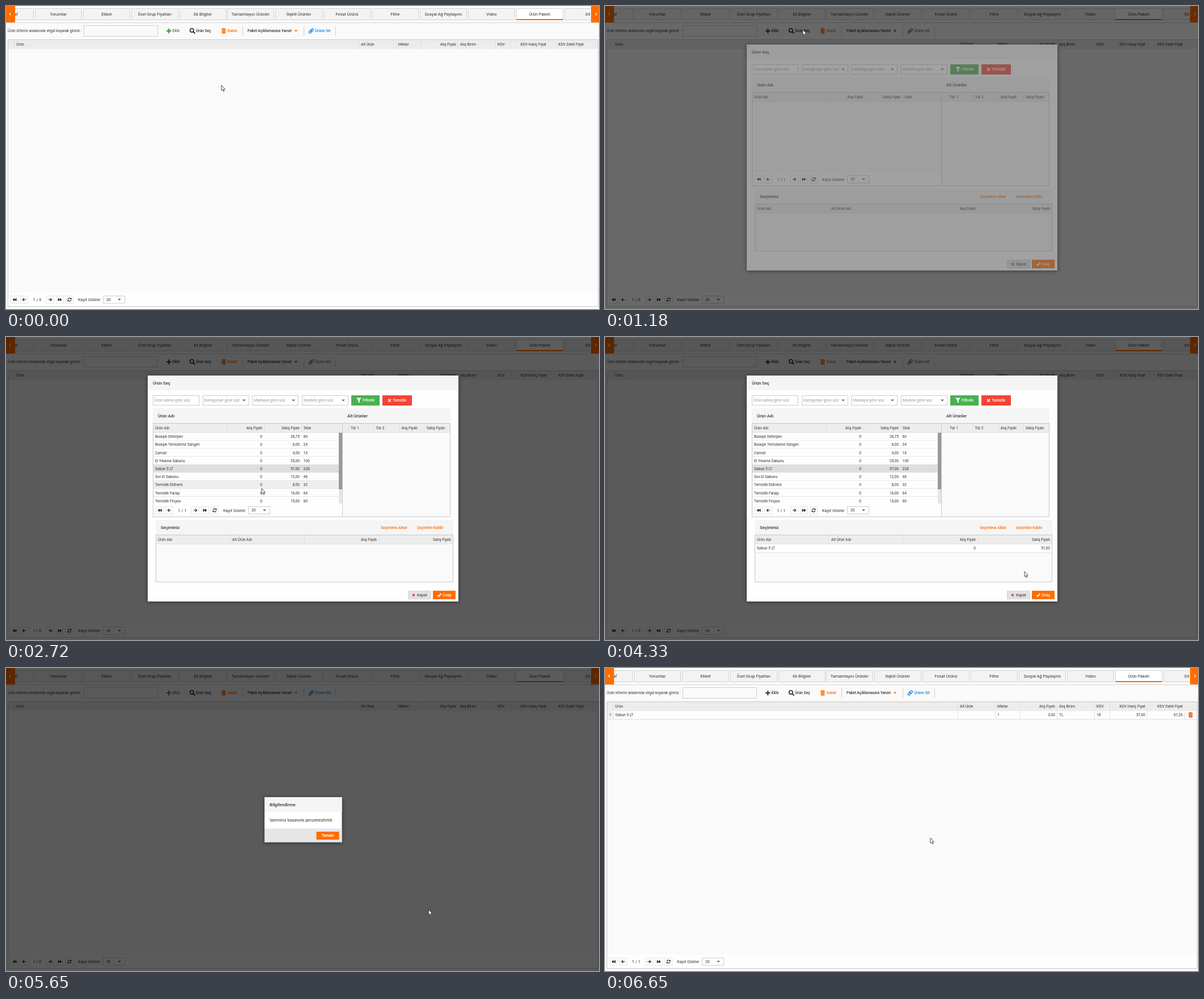
An HTML page with a canvas for the animation above (7.49 s loop, 1046 by 535 pixels).

```html
<!DOCTYPE html>
<html lang="tr">
<head>
<meta charset="utf-8">
<title>Ürün Paketi</title>
<style>
  html, body { margin: 0; width: 100%; height: 100%; overflow: hidden; background: #fafafa; }
  canvas { display: block; }
</style>
</head>
<body>
<canvas id="stage" width="1046" height="535"></canvas>
<script>
const ctx = document.getElementById('stage').getContext('2d');
const LOOP = 7490;
const ORANGE = '#ff6d00', INK = '#333', LINE = '#c8c8c8', SOFT = '#e2e2e2';

// Bursts of screen updates: start, end, number of steps.
const bursts = [
  [120, 800, 10], [870, 1560, 10], [1640, 1870, 4], [2020, 2720, 10],
  [2790, 3480, 10], [3560, 3720, 3], [4020, 4710, 10], [4790, 4870, 2],
  [5020, 5020, 1], [5650, 6340, 10], [6420, 6650, 4]
];

// Pointer path: time, x, y.
const path = [
  [50, 380, 140], [420, 366, 92], [800, 349, 42], [1250, 349, 42],
  [1560, 422, 121], [1870, 383, 226], [2100, 383, 226], [2650, 451, 267.5],
  [2720, 451, 267.5], [3400, 704, 333], [3943, 704, 333], [4327, 740, 414],
  [4710, 777, 450], [5580, 777, 450], [6030, 574, 300]
];
const handTimes = [[700, 1020], [3400, 4100], [4640, 4800], [5980, 6500]];

const products = [
  ['Bulaşık Deterjanı', '26,75', 60], ['Bulaşık Temizleme Süngeri', '6,00', 24],
  ['Camsil', '4,00', 16], ['El Yıkama Sabunu', '25,00', 100],
  ['Sabun 5 LT', '57,00', 228], ['Sıvı El Sabunu', '12,00', 46],
  ['Temizlik Eldiveni', '8,00', 32], ['Temizlik Faraşı', '16,00', 64],
  ['Temizlik Fırçası', '15,00', 60]
];
const tabs = ['Fotoğraf', 'Yorumlar', 'Etiket', 'Özel Grup Fiyatları', 'Ek Bilgiler',
  'Tamamlayıcı Ürünler', 'İlişkili Ürünler', 'Fırsat Ürünü', 'Filtre',
  'Sosyal Ağ Paylaşımı', 'Video', 'Ürün Paketi', 'Dil'];

const ramp = (t, a, b) => Math.min(1, Math.max(0, (t - a) / (b - a)));

function stepTime(t) {
  let last = 0;
  for (const [a, b, n] of bursts) {
    if (t < a) break;
    const gap = (b - a) / (n - 1 || 1);
    last = a + (gap ? Math.min(n - 1, Math.floor((t - a) / gap + 0.001)) * gap : 0);
  }
  return last;
}

function pointerAt(t) {
  if (t <= path[0][0]) return path[0].slice(1);
  const i = path.findIndex(key => key[0] > t);
  if (i < 0) return path[path.length - 1].slice(1);
  const [ta, xa, ya] = path[i - 1], [tb, xb, yb] = path[i], p = ramp(t, ta, tb);
  return [xa + (xb - xa) * p, ya + (yb - ya) * p];
}

// Drawing helpers
function rect(x, y, w, h, fill, stroke) {
  if (fill) { ctx.fillStyle = fill; ctx.fillRect(x, y, w, h); }
  if (stroke) {
    ctx.strokeStyle = stroke; ctx.lineWidth = 1;
    ctx.strokeRect(x + 0.5, y + 0.5, w - 1, h - 1);
  }
}

function text(str, x, y, { size = 6.6, color = INK, align = 'left', weight = 400 } = {}) {
  ctx.font = `${weight} ${size}px Roboto, "Noto Sans", sans-serif`;
  ctx.fillStyle = color;
  ctx.textAlign = align;
  ctx.fillText(str, x, y + size * 0.36);
}
const right = (str, x, y) => text(str, x, y, { align: 'right' });
const bold = (str, x, y, color = INK, size = 6.65) => text(str, x, y, { size, color, weight: 500 });

function poly(points, fill) {
  ctx.beginPath();
  points.forEach(([x, y]) => ctx.lineTo(x, y));
  ctx.closePath();
  ctx.fillStyle = fill;
  ctx.fill();
}

function stroke(points, color, width = 1.4) {
  ctx.beginPath();
  points.forEach(([x, y]) => ctx.lineTo(x, y));
  ctx.strokeStyle = color;
  ctx.lineWidth = width;
  ctx.stroke();
}

const vlines = (xs, y, h, color) => xs.forEach(x => rect(x, y, 1, h, color));
const caret = (x, y, color = '#666') => poly([[x - 3, y - 1.5], [x + 3, y - 1.5], [x, y + 1.5]], color);
const cross = (x, y, r, color) => {
  stroke([[x - r, y - r], [x + r, y + r]], color, 1.6);
  stroke([[x + r, y - r], [x - r, y + r]], color, 1.6);
};

function trash(x, y, color) {
  rect(x, y - 4, 8, 1.4, color);
  rect(x + 2.5, y - 5, 3, 1.2, color);
  rect(x + 0.8, y - 2, 6.4, 6.5, color);
  vlines([x + 2.4, x + 4.7], y - 1, 4.3, 'rgba(255,255,255,.6)');
}

function refresh(x, y) {
  ctx.strokeStyle = '#222';
  ctx.lineWidth = 1.1;
  for (const s of [1, -1]) {
    ctx.beginPath();
    ctx.arc(x, y, 2.8, s > 0 ? 3.4 : 0.26, s > 0 ? 5.8 : 2.66);
    ctx.stroke();
    poly([[x + 3.6 * s, y - 3.4 * s], [x + 3.6 * s, y - 0.6 * s], [x + 0.9 * s, y - 0.6 * s]], '#222');
  }
}

function linkIcon(x, y, color) {
  ctx.save();
  ctx.translate(x, y);
  ctx.rotate(-Math.PI / 4);
  ctx.strokeStyle = color;
  ctx.lineWidth = 1.3;
  for (const dx of [-5, -0.8]) {
    ctx.beginPath();
    ctx.roundRect(dx, -1.8, 5.8, 3.6, 1.8);
    ctx.stroke();
  }
  ctx.restore();
}

function pager(dx, y, pages) {
  for (const x of [15, 32, 78, 95, 112]) rect(dx + x - 7, y - 7, 14, 14, '#fff', '#e4e4e4');
  for (const [x, s] of [[15, -1], [95, 1]])
    for (const o of [-3.4, 0])
      poly([[dx + x + o + (s < 0 ? 3.5 : 0), y - 3], [dx + x + o + (s < 0 ? 3.5 : 0), y + 3],
        [dx + x + o + (s < 0 ? 0 : 3.5), y]], '#222');
  for (const [x, s] of [[32, -1], [78, 1]]) {
    const c = dx + x;
    stroke([[c - 3 * s, y], [c + 2.6 * s, y]], '#222', 1.1);
    stroke([[c, y - 2.7], [c + 2.7 * s, y], [c, y + 2.7]], '#222', 1.1);
  }
  refresh(dx + 112, y);
  text(pages, dx + 55, y, { size: 7.3, align: 'center' });
  text('Kayıt Göster', dx + 127, y, { size: 7.3 });
  rect(dx + 171, y - 7, 39, 14, '#fff', '#ccc');
  text('20', dx + 177, y, { size: 6.8 });
  caret(dx + 200, y);
}

function drawTabs() {
  rect(0, 29, 1046, 1, '#d4d4d4');
  tabs.forEach((name, i) => {
    const x = Math.round(51 + 84.87 * (i - 1)), active = name === 'Ürün Paketi';
    rect(x, 4, 83, 21, active ? '#fff' : '#f3f3f3', '#d2d2d2');
    if (active) rect(x, 23, 83, 2, ORANGE);
    text(name, x + 41.3, 14.2, { size: 7.35, align: 'center' });
  });
  rect(0, 0, 16, 29, ORANGE);
  rect(1032, 0, 14, 29, ORANGE);
  stroke([[8.5, 11.8], [6.2, 14.2], [8.5, 16.6]], '#fff', 1.2);
  stroke([[1039.5, 11.8], [1041.8, 14.2], [1039.5, 16.6]], '#fff', 1.2);
}

function drawToolbar(t) {
  const y = 44, dialogOpen = t >= 1020 && t < 4790;
  const add = dialogOpen || t >= 6340 ? '#263a2a' : '#388e3c';
  const link = dialogOpen ? '#777' : '#1e88e5';
  text("Ürün id'lerini aralarında virgül koyarak giriniz :", 3, y, { size: 6.55 });
  rect(137, 34, 131, 20, '#fafafa', '#d0d0d0');
  rect(283, y - 1, 8.5, 2, add);
  rect(286.3, y - 4.2, 2, 8.5, add);
  bold('Ekle', 293.5, y, add, 6.9);
  ctx.beginPath();
  ctx.arc(327.8, 43, 3.2, 0, 7);
  ctx.strokeStyle = '#222';
  ctx.lineWidth = 1.5;
  ctx.stroke();
  stroke([[330.2, 45.4], [333.6, 48.6]], '#222', 1.9);
  bold('Ürün Seç', 335, y);
  trash(380, y, ORANGE);
  bold('Kaldır', 391, y, ORANGE);
  vlines([417, 525, 581], 35, 18, '#d0d0d0');
  bold('Paket Açıklamasına Yansıt', 426, y, INK, 6.55);
  caret(511.5, y, dialogOpen ? '#444' : ORANGE);
  linkIcon(538.3, y, link);
  bold('Ürüne Git', 545, y, link);
}

function drawPage(t) {
  rect(0, 0, 1046, 535, '#fafafa');
  drawTabs();
  drawToolbar(t);
  const filled = t >= 5720;
  rect(3, 59, 1042, 472, '#fafafa', LINE);
  rect(4, 60, 1040, 16, '#ececec');
  const columns = [14, 622, 688, 732, 797, 863, 890, 956, 1022];
  vlines(columns.slice(0, -1), 60, 16, SOFT);
  text('Ürün', 18, 67.5);
  text('Alt Ürün', 626, 67.5);
  text('Miktar', 692, 67.5);
  right('Alış Fiyatı', 794, 67.5);
  text('Alış Birim', 801, 67.5);
  text('KDV', 867, 67.5);
  right('KDV Hariç Fiyat', 953, 67.5);
  right('KDV Dahil Fiyat', 1019, 67.5);
  if (filled) {
    rect(4, 76, 1040, 14, '#fdfdfd');
    rect(4, 76, 10, 14, '#f0f0f0');
    rect(4, 90, 1040, 1, '#dedede');
    vlines(columns, 76, 14, SOFT);
    const y = 83;
    text('1', 9, y, { align: 'center' });
    text('Sabun 5 LT', 18, y);
    text('1', 692, y);
    right('0,00', 794, y);
    text('TL', 801, y);
    text('18', 867, y);
    right('57,00', 953, y);
    right('67,26', 1019, y);
    trash(1029, y, '#f4511e');
  }
  rect(4, 506, 1040, 24, '#fefefe');
  pager(0, 518.5, filled ? '1 / 1' : '1 / 0');
}

function panel(x, y, w, h) {
  rect(x, y, w, h, '#fafafa', LINE);
  rect(x + 1, y + 1, w - 2, 15, '#ededed');
  rect(x + 1, y + 16, w - 2, 1, '#e0e0e0');
}

function shadowBox(x, y, w, h) {
  ctx.save();
  ctx.shadowColor = 'rgba(0,0,0,.45)';
  ctx.shadowBlur = 7;
  ctx.shadowOffsetY = 1;
  rect(x, y, w, h, '#fff');
  ctx.restore();
}

function drawProducts(t, [px, py]) {
  const loaded = t >= 1400, shift = loaded ? 0 : 3.5;
  panel(259, 152, 335, 166);
  vlines([390, 456, 521].map(x => Math.round(x + shift)), 153, 15, SOFT);
  text('Ürün Adı', 263, 160.5);
  right('Alış Fiyatı', 452 + shift, 160.5);
  right('Satış Fiyatı', 518 + shift, 160.5);
  text('Stok', 525 + shift, 160.5);
  if (loaded) {
    const inGrid = px > 260 && px < 587 && py > 168.5 && py < 294;
    const hovered = inGrid ? Math.floor((py - 168.5) / 14.2) : -1;
    ctx.save();
    ctx.beginPath();
    ctx.rect(260, 169, 333, 125);
    ctx.clip();
    products.forEach(([name, price, stock], i) => {
      const top = 168.5 + i * 14.2, y = top + 7.4;
      const picked = i === 4 && t >= 2020;
      rect(260, top, 327, 14.2, picked ? '#dedede' : i === hovered ? '#eee' : '#fdfdfd');
      rect(260, Math.round(top + 13.5), 327, 1, '#e4e4e4');
      text(name, 263, y);
      right('0', 452, y);
      right(price, 518, y);
      text(stock, 524.5, y);
    });
    rect(587, 168, 6, 126, '#e6e6e6');
    rect(587, 168, 6, 101, '#999');
    ctx.restore();
    rect(587, 153, 1, 15, SOFT);
  }
  rect(260, 294, 333, 23, '#fefefe');
  pager(256, 306, '1 / 1');

  panel(593, 152, 191, 166);
  vlines([604, 649, 694, 738], 153, 15, SOFT);
  text('Tür 1', 608, 160.5);
  text('Tür 2', 652.5, 160.5);
  text('Alış Fiyatı', 697.5, 160.5);
  text('Satış Fiyatı', 742, 160.5);
  if (t >= 2090 && t < 2260) rect(594, 153, 189, 164, 'rgba(0,0,0,.08)');
}

function drawPicker(t, pointer) {
  shadowBox(250, 68, 548, 399);
  rect(250, 68, 548, 399, '#fefefe');
  rect(250, 68, 548, 26, '#f5f5f5');
  bold('Ürün Seç', 259, 81, INK, 7.65);

  ['Ürün adına', 'Kategoriye', 'Markaya', 'Modele'].forEach((what, i) => {
    const x = Math.round(259 + i * 87.6);
    rect(x, 103, 82, 18, '#fff', '#ccc');
    text(what + ' göre süz', x + 3, 111.7, { size: 7.1, color: '#999' });
    if (i) caret(x + 73, 112);
  });
  rect(609, 103, 50, 18, '#4caf50');
  poly([[618, 107.5], [627, 107.5], [623.8, 111.5], [623.8, 116.5], [621.3, 114.5], [621.3, 111.5]], '#fff');
  bold('Filtrele', 629, 112, '#fff', 6.9);
  rect(664, 103, 52, 18, '#f44336');
  cross(676.5, 112, 2.5, '#fff');
  bold('Temizle', 682, 112, '#fff', 6.9);

  rect(259, 126, 525, 26, '#f5f5f5');
  bold('Ürün Adı', 268, 139, INK, 7.55);
  bold('Alt Ürünler', 602, 139, INK, 7.55);
  drawProducts(t, pointer);

  rect(264, 323, 525, 26, '#f5f5f5');
  bold('Seçiminiz', 273, 336, INK, 7.65);
  bold('Seçimime Aktar', 661, 336.5, ORANGE, 6.6);
  bold('Seçimleri Kaldır', 725, 336.5, ORANGE, 6.6);
  panel(264, 349, 525, 84);
  vlines([395, 526, 658], 350, 15, SOFT);
  text('Ürün Adı', 268, 357.7);
  text('Alt Ürün Adı', 399, 357.7);
  right('Alış Fiyatı', 654, 357.7);
  right('Satış Fiyatı', 785, 357.7);
  if (t >= 3600) {
    rect(265, 366, 523, 14, '#fefefe');
    rect(265, 380, 523, 1, '#e4e4e4');
    text('Sabun 5 LT', 268, 373);
    right('0', 654, 373);
    right('57,00', 785, 373);
  }

  rect(709, 448, 41, 15, '#e2e2e2', '#d6d6d6');
  cross(719, 455.7, 2, '#e53935');
  text('Kapat', 725, 455.7, { size: 6.9 });
  rect(753, 448, 40, 15, ORANGE);
  stroke([[761, 455.8], [763.3, 458], [767.5, 453.2]], '#fff', 1.8);
  bold('Onay', 770, 455.7, '#fff', 6.7);
}

function drawMessage(t) {
  shadowBox(456, 228, 136.5, 79.5);
  rect(456, 228, 136.5, 26, '#f5f5f5');
  rect(456, 283.5, 136.5, 24, '#e6e6e6');
  bold('Bilgilendirme', 465, 241, INK, 7.75);
  text('İşleminiz başarıyla gerçekleştirildi.', 465, 268.5, { size: 7.4 });
  rect(547.5, 289, 40, 14, t >= 5980 ? '#f06400' : ORANGE);
  text('Tamam', 567.5, 296, { size: 6.5, color: '#fff', weight: 700, align: 'center' });
}

function drawPointer(x, y, hand) {
  ctx.save();
  ctx.translate(x, y);
  ctx.fillStyle = '#fff';
  ctx.strokeStyle = '#222';
  ctx.lineWidth = 0.8;
  const shape = new Path2D(hand
    ? 'M-1 1Q0-.6 1 1V5Q2.2 4 3 5.3Q4.2 4.4 5 5.7Q6.4 5.2 6.4 6.8V9.5L5 13H-.2L-3.2 8.6Q-3.6 6.9-2 7.4L-1 8.4Z'
    : 'M0 0V9.2L2 7.4L3.5 10.8L5 10.1L3.6 6.9H6.3Z');
  ctx.fill(shape);
  ctx.stroke(shape);
  ctx.restore();
}

function fading(alpha, draw) {
  if (alpha <= 0) return;
  ctx.save();
  ctx.globalAlpha = alpha;
  draw();
  ctx.restore();
}

// The translucent picker is composed as a whole by dimming what lies over it.
function drawTranslucentPicker(t, pointer, alpha) {
  drawPicker(t, pointer);
  if (alpha < 1) fading(1 - alpha, () => rect(250, 68, 548, 399, '#5e5e5e'));
}

function render() {
  const t = stepTime(performance.now() % LOOP);
  const pointer = pointerAt(t);
  const pickerAlpha = t < 4790 ? ramp(t, 1020, 1390) : 0;
  let shade = 0;
  if (t < 4790) shade = ramp(t, 940, 1200);
  else if (t < 4860) shade = 0.5;
  else if (t >= 5020) shade = 1 - ramp(t, 6343, 6650);
  drawPage(t);
  fading(shade * 0.64, () => rect(0, 0, 1046, 535, '#000'));
  if (pickerAlpha > 0) drawTranslucentPicker(t, pointer, pickerAlpha);
  if (t >= 5020 && t < 6490) drawMessage(t);
  drawPointer(...pointer, handTimes.some(([a, b]) => t >= a && t < b));
  requestAnimationFrame(render);
}
render();
</script>
</body>
</html>
```
